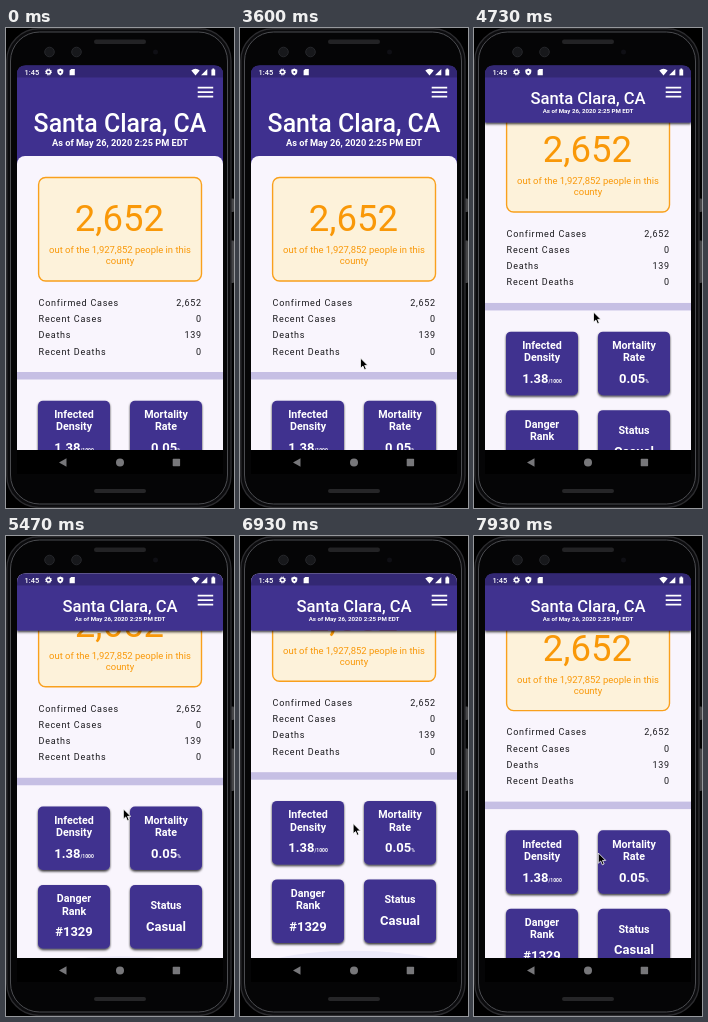
These frames come from a looping animation (228x480 px, 8000 ms). An HTML page:

```html
<!DOCTYPE html>
<html lang="en">
<head>
<meta charset="utf-8">
<title>County statistics</title>
<style>
  html, body { margin: 0; width: 100%; height: 100%; overflow: hidden; background: #000; }
  svg { display: block; width: 100vw; height: 100vh; font-family: Roboto, sans-serif; }
  .mid { text-anchor: middle; }
  .end { text-anchor: end; }
  .bold { font-weight: 700; }
  .list { font-size: 9px; letter-spacing: .75px; fill: #19181c; }
  .orange { fill: #f99808; }
  .tile text { fill: #fff; font-weight: 700; text-anchor: middle; }
  .name { font-size: 10.7px; }
  .value { font-size: 13px; }
  .unit { font-size: 5px; }
</style>
</head>
<body>
<svg viewBox="0 0 228 480">
  <defs>
    <clipPath id="screen"><path d="M11 422V46.5q0-9 9-9h188q9 0 9 9V422z"/></clipPath>
    <clipPath id="sheet"><rect x="11" y="128" width="206" height="422.5" rx="8"/></clipPath>
    <filter id="shadow" x="-20%" y="-20%" width="140%" height="150%">
      <feDropShadow dx="0" dy="1.5" stdDeviation="1.1" flood-opacity=".8"/>
    </filter>
  </defs>

  <!-- Phone body -->
  <rect width="228" height="480"/>
  <rect x="224.5" y="170.5" width="3.5" height="13.5" rx="1" fill="#454547"/>
  <rect x="224.5" y="212.5" width="3.5" height="42.5" rx="1" fill="#454547"/>
  <rect x=".8" y=".8" width="224.2" height="478.6" rx="32" fill="#0b0b0d" stroke="#2c2c2f" stroke-width="1.4"/>
  <rect x="4.5" y="4" width="217" height="472" rx="29" fill="#050506" stroke="#4b4c50"/>
  <rect x="88" y="11.5" width="52" height="4.5" rx="2.2" fill="#232325"/>
  <rect x="88" y="461" width="52" height="4" rx="2" fill="#262628"/>
  <g fill="#17181b" stroke="#26272b">
    <circle cx="43.5" cy="24" r="4.8"/>
    <circle cx="70.5" cy="24" r="4.8"/>
  </g>
  <circle cx="149.5" cy="24" r="2.5" fill="#0f0f14"/>

  <g clip-path="url(#screen)">
    <rect x="11" y="37" width="206" height="386" fill="#3f308f"/>
    <g id="page">
      <g clip-path="url(#sheet)">
        <rect x="11" y="128" width="206" height="423" fill="#f9f5fd"/>
        <ellipse cx="114" cy="553" rx="116" ry="30.5" fill="#ebe9f9"/>
        <rect x="11" y="344" width="206" height="7.5" fill="#c6bfe4"/>
      </g>
      <rect x="32.6" y="149.5" width="162.9" height="103.5" rx="7" fill="#fdf2da" stroke="#f9a01d" stroke-width="1.4"/>
      <g class="mid orange">
        <text x="113.4" y="203" font-size="36.5">2,652</text>
        <g font-size="9.45">
          <text x="114" y="225.4">out of the 1,927,852 people in this</text>
          <text x="114" y="236.4">county</text>
        </g>
      </g>
      <g id="list" class="list"></g>
      <g id="tiles"></g>
    </g>

    <!-- Collapsing header -->
    <rect id="header" x="11" y="37" width="206" fill="#3f308f"/>
    <g id="title" class="mid" fill="#fff">
      <text y="-9.2" font-size="16.6" font-weight="500">Santa Clara, CA</text>
      <text class="bold" font-size="6.15">As of May 26, 2020 2:25 PM EDT</text>
    </g>
    <path d="M191.7 59.6h15.5M191.7 64.1h15.5M191.7 68.6h15.5" stroke="#fff" stroke-width="1.8"/>

    <!-- Status bar -->
    <rect x="11" y="37" width="206" height="12.5" fill="#000" opacity=".2"/>
    <g fill="#fff">
      <text x="18.6" y="46.7" font-size="7.4" font-weight="500">1:45</text>
      <circle cx="42.5" cy="44" r="2" fill="none" stroke="#fff" stroke-width="1.4"/>
      <circle cx="42.5" cy="44" r="3" fill="none" stroke="#fff" stroke-dasharray="1.2 1.156"/>
      <path d="M54.3 40.6l3 1.2v2.3q0 2.3-3 3.5q-3-1.2-3-3.5v-2.3z"/>
      <circle cx="54.3" cy="44" r="1" fill="#352879"/>
      <path d="M65.2 41h3.6v6.2h-5.2v-4.6z"/>
      <path d="M185.3 42.4q4.2-3.2 8.4 0l-4.2 5z"/>
      <path d="M201.3 41v6.2h-6.2z"/>
      <path d="M205.4 41.4h1v-.8h1.8v.8h1v6h-3.8z"/>
    </g>
  </g>

  <!-- Navigation bar -->
  <rect x="11" y="422" width="206" height="24" fill="#000"/>
  <g fill="#77777a">
    <path d="M53 434.5l7.5-4.3v8.6z"/>
    <circle cx="114" cy="434.5" r="4"/>
    <rect x="166.7" y="430.8" width="7.4" height="7.4" rx=".6"/>
  </g>

  <path id="cursor" d="M0 0v10.2l2.4-2.2 1.6 3.8 1.8-.8-1.6-3.6h3.2z" stroke="#fff" stroke-width=".8"/>
</svg>

<script>
const LOOP = 8000, COLLAPSE = 33.5, CURSOR_ON = 1400;
const el = id => document.getElementById(id);

const rows = [["Confirmed Cases", "2,652"], ["Recent Cases", "0"], ["Deaths", "139"], ["Recent Deaths", "0"]];
el("list").innerHTML = rows.map(([label, value], i) => {
  const y = 277.9 + i * 16.2;
  return `<text x="32.6" y="${y}">${label}</text><text class="end" x="195.9" y="${y}">${value}</text>`;
}).join("");

function tile(x, y, names, value, unit = "") {
  const first = names.length > 1 ? 17.5 : 24;
  const lines = names.map((n, i) => `<text class="name" x="36" y="${first + i * 12.2}">${n}</text>`).join("");
  const valueY = names.length > 1 ? 51.5 : 45.7;
  return `<g class="tile" transform="translate(${x} ${y})">
    <rect width="72" height="63.5" rx="5" fill="#3f308f" filter="url(#shadow)"/>${lines}
    <text class="value" x="36" y="${valueY}">${value}<tspan class="unit">${unit}</tspan></text></g>`;
}
el("tiles").innerHTML =
  tile(32, 372.7, ["Infected", "Density"], "1.38", "/1000") +
  tile(124, 372.7, ["Mortality", "Rate"], "0.05", "%") +
  tile(32, 451.2, ["Danger", "Rank"], "#1329") +
  tile(124, 451.2, ["Status"], "Casual");

// Keys: time, scroll offset, cursor x, cursor y
const keys = [
  [1400, 0, 144, 285],
  [1870, 0, 139, 294],
  [3600, 0, 120.5, 330],
  [4000, 0, 120, 351],
  [4730, 69, 119.5, 284],
  [5600, 108, 117, 271],
  [6470, 128.6, 114.3, 266.5],
  [7270, 92.5, 112.3, 303],
  [7930, 78.4, 124.3, 317],
  [8000, 78, 125, 317.6]
];

function pose(t) {
  if (t <= keys[0][0]) return keys[0].slice(1);
  const i = keys.findIndex(k => k[0] > t);
  const a = keys[i - 1], b = keys[i];
  const u = (t - a[0]) / (b[0] - a[0]);
  return [1, 2, 3].map(c => a[c] + (b[c] - a[c]) * u);
}

function draw(t) {
  const [scroll, x, y] = pose(t);
  const fold = Math.min(1, scroll / COLLAPSE);
  el("page").setAttribute("transform", `translate(0 ${-scroll})`);
  el("header").setAttribute("height", 91 - COLLAPSE * fold);
  if (fold === 1) el("header").setAttribute("filter", "url(#shadow)");
  else el("header").removeAttribute("filter");
  el("title").setAttribute("transform", `translate(114 ${117.8 - 32.4 * fold}) scale(${1.5 - fold / 2})`);
  el("cursor").setAttribute("transform", `translate(${x} ${y})`);
  el("cursor").setAttribute("visibility", t < CURSOR_ON ? "hidden" : "visible");
}

const start = performance.now();
function tick() {
  draw((performance.now() - start) % LOOP);
  requestAnimationFrame(tick);
}
tick();
</script>
</body>
</html>
```
